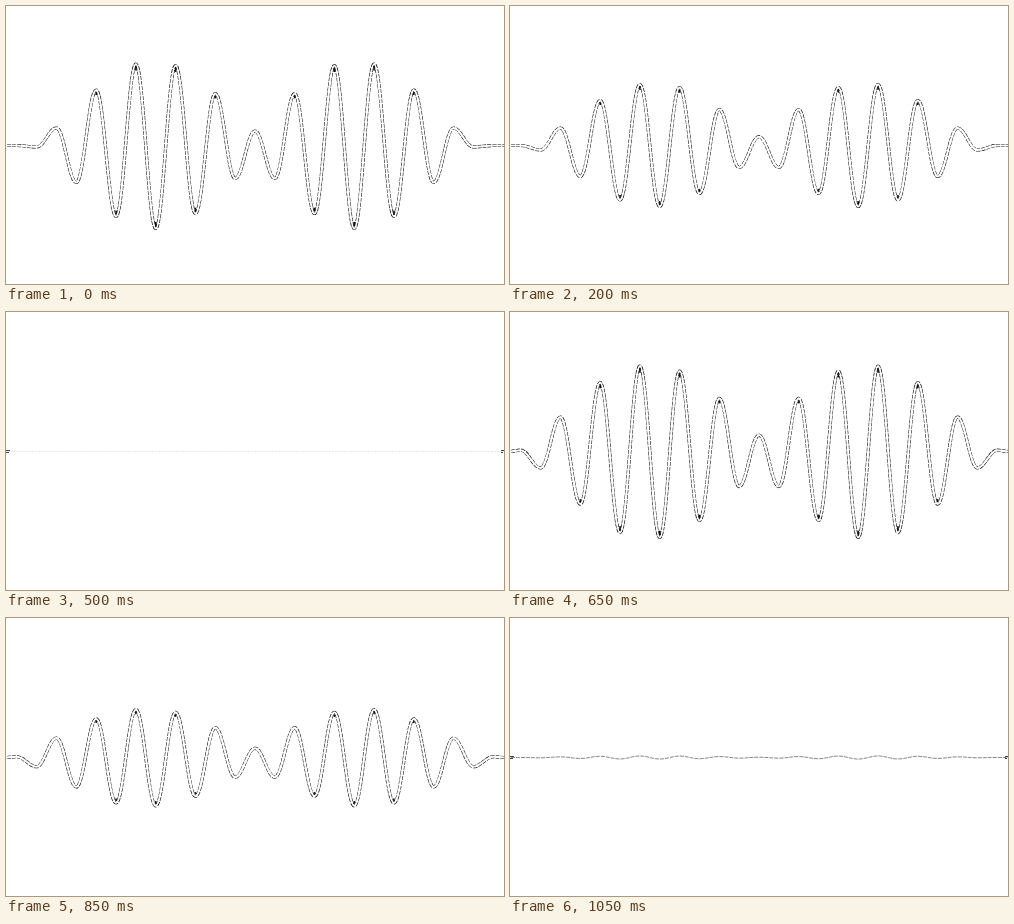
Animation of 498 by 278 pixels, one loop 1.1 s. Source, as an HTML page with a canvas:

```html
<!DOCTYPE html>
<html lang="en">
<head>
<meta charset="utf-8">
<title>Wave pulse</title>
<style>
  html, body { margin: 0; width: 100%; height: 100%; overflow: hidden; background: #fff; }
  canvas { display: block; }
</style>
</head>
<body>
<canvas id="stage" width="498" height="278"></canvas>
<script>
const ctx = document.getElementById('stage').getContext('2d');
const W = 498, H = 278, AXIS = 139.5, MID = 249, GAP = 19.85;
const LOOP = 1100, STEP = 50;

// Crest heights from the left end to the centre; the right half mirrors them.
const burst = [0, 1.5, 17.5, 37, 55.5, 71, 81.5, 83, 80, 68, 52, 33, 14.5];
const fade = [0, 4.5, 17.5, 31, 45, 54.5, 61, 61, 58, 48, 36, 22, 8.8];
const swell = [1.2, 15, 31.5, 48, 63, 74, 78, 78.5, 73.5, 63, 48.5, 32, 15];

// time, shape, scale
const keys = [
  [0, burst, 1], [200, fade, 1], [300, fade, 0.68], [500, fade, 0],
  [599, fade, 0], [600, swell, 1.11], [700, swell, 1.08], [750, swell, 1],
  [850, swell, 0.615], [950, swell, 0.25], [1050, swell, 0.02], [1100, swell, 0]
];

function heightsAt(t) {
  const i = keys.findIndex(k => k[0] > t) - 1;
  const [t0, a, p] = keys[i], [t1, b, q] = keys[i + 1];
  const u = (t - t0) / (t1 - t0);
  return a.map((h, k) => h * p * (1 - u) + b[k] * q * u);
}

// Turning points of the wave, left to right; up is the sign of the crest.
function crestsOf(heights) {
  const last = heights.length - 1;
  return Array.from({ length: 2 * last + 1 }, (_, k) => {
    const h = heights[last - Math.abs(k - last)];
    const up = k % 2 ? -1 : 1;
    return { x: MID + (k - last) * GAP, y: AXIS - up * h, h, up };
  });
}

function wavePath(crests) {
  const path = new Path2D();
  const pull = GAP * 0.375;
  let { x: px, y: py } = crests[0];
  path.moveTo(-4, AXIS);
  path.lineTo(0, AXIS);
  path.bezierCurveTo(4, AXIS, 6, py, px, py);
  for (const { x, y } of crests.slice(1)) {
    path.bezierCurveTo(px + pull, py, x - pull, y, x, y);
    px = x;
    py = y;
  }
  path.bezierCurveTo(W - 6, py, W - 4, AXIS, W, AXIS);
  path.lineTo(W + 4, AXIS);
  return path;
}

function stroke(path, color, width, dash = []) {
  ctx.strokeStyle = color;
  ctx.lineWidth = width;
  ctx.setLineDash(dash);
  ctx.stroke(path);
}

function drawEnds() {
  ctx.fillStyle = '#444';
  for (const y of [138, 140]) {
    ctx.fillRect(0, y, y === 138 ? 4 : 3, 1);
    ctx.fillRect(495, y, y === 138 ? 3 : 2, 1);
  }
}

// Ink gathers inside the sharp bends.
function drawInk(crests) {
  ctx.fillStyle = '#111';
  for (const { x, y, h, up } of crests) {
    if (h > 37) ctx.fillRect(x - 0.8, y + up * 2, 1.6, up * h / 18);
  }
}

function draw(t) {
  const heights = heightsAt(t);
  const peak = Math.max(...heights);
  const crests = crestsOf(heights);
  const path = wavePath(crests);
  ctx.fillStyle = '#fff';
  ctx.fillRect(0, 0, W, H);
  ctx.lineJoin = 'round';
  if (peak < 0.5) {
    stroke(path, '#e6e6e6', 1, [2, 1]);
    drawEnds();
  } else if (peak < 4) {
    stroke(path, '#888', 1, [4, 1]);
    drawEnds();
  } else {
    stroke(path, '#111', 3.2, [4, 1]);
    stroke(path, '#fff', 2.1);
    drawInk(crests);
  }
}

function tick() {
  const t = performance.now() % LOOP;
  draw(Math.floor(t / STEP) * STEP);
  requestAnimationFrame(tick);
}
tick();
</script>
</body>
</html>
```
